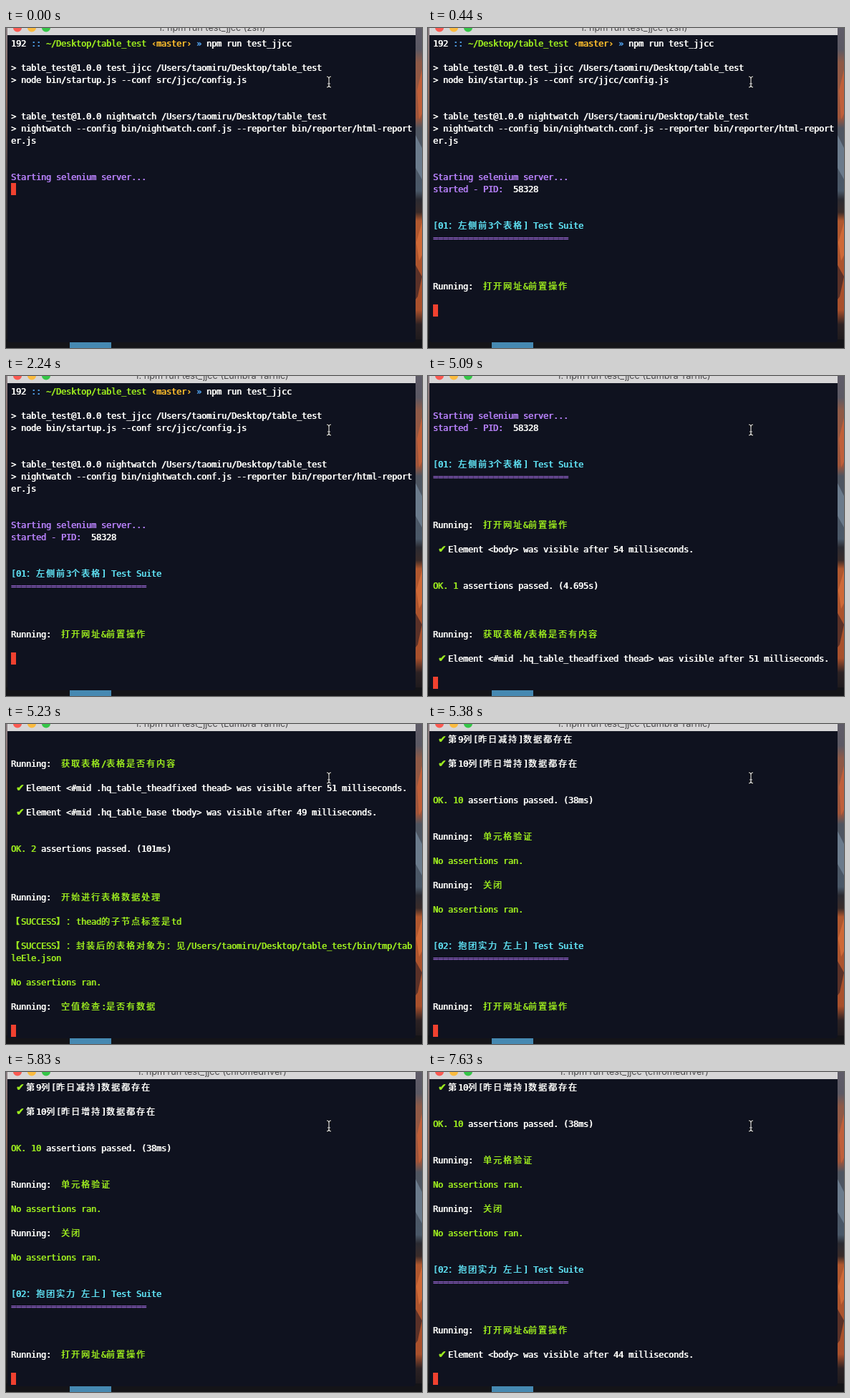
These frames come from a looping animation (581x448 px, 8000 ms). An HTML page with a canvas:

```html
<!DOCTYPE html>
<html lang="zh-CN">
<head>
<meta charset="utf-8">
<style>
html, body { margin: 0; width: 100%; height: 100%; overflow: hidden; background: #111; }
canvas { display: block; width: 581px; height: 448px; }
</style>
</head>
<body>
<canvas id="stage" width="581" height="448"></canvas>
<script>
const ctx = document.getElementById('stage').getContext('2d');
const LOOP = 8000, CELL = 7, ROW = 17;
const MONO = '12px "DejaVu Sans Mono", monospace';
const HAN = '12px "Noto Sans CJK SC", "Noto Sans CJK", sans-serif';
const TICK = '14px "DejaVu Sans", sans-serif';
const W = '#fdfdfa', G = '#9be81f', P = '#b47ff6', C = '#5fe0f2', B = '#4f9fe8', Y = '#fabb2c', D = '#9463cc';

// Lines are [row, colour, text, colour, text, ...]
const run = (row, name) => [row, W, 'Running:  ', G, name];
const pass = (row, text) => [row, G, ' ✔ ', W, text];
const seen = (row, el, ms) => pass(row, `Element <${el}> was visible after ${ms} milliseconds.`);
const ok = (row, n, time) => [row, G, `OK. ${n}`, W, ` assertions passed. (${time})`];
const none = row => [row, G, 'No assertions ran.'];
const suite = (row, name) => [[row, C, `[${name}] Test Suite`], [row + 1, D, '='.repeat(27)]];
const server = row => [row, P, 'Starting selenium server...'];
const pid = row => [row, P, 'started - PID:', W, '  58328'];

const first = '01：左侧前3个表格', second = '02：抱团实力 左上';
const open = '打开网址&前置操作', content = '获取表格/表格是否有内容';
const home = '/Users/taomiru/Desktop/table_test';

const boot = [
  [0, W, '192 ', B, ':: ', G, '~/Desktop/table_test ', Y, '‹master› ', B, '» ', W, 'npm run test_jjcc'],
  [2, W, '> table_test@1.0.0 test_jjcc ' + home],
  [3, W, '> node bin/startup.js --conf src/jjcc/config.js'],
  [6, W, '> table_test@1.0.0 nightwatch ' + home],
  [7, W, '> nightwatch --config bin/nightwatch.conf.js --reporter bin/reporter/html-report'],
  [8, W, 'er.js'],
  server(11)
];
const started = [...boot, pid(12)];

const screens = [
  { at: 0, caret: 12, lines: boot },
  { at: 140, caret: 14, lines: started },
  { at: 440, caret: 22, lines: [...started, ...suite(15, first), run(20, open)] },
  { at: 5090, caret: 24, lines: [
    server(2), pid(3), ...suite(6, first),
    run(11, open), seen(13, 'body', 54), ok(16, 1, '4.695s'),
    run(20, content), seen(22, '#mid .hq_table_theadfixed thead', 51)
  ] },
  { at: 5230, caret: 24, lines: [
    run(2, content),
    seen(4, '#mid .hq_table_theadfixed thead', 51),
    seen(6, '#mid .hq_table_base tbody', 49),
    ok(9, 2, '101ms'),
    run(13, '开始进行表格数据处理'),
    [15, G, '【SUCCESS】：thead的子节点标签是td'],
    [17, G, `【SUCCESS】：封装后的表格对象为：见${home}/bin/tmp/tab`],
    [18, G, 'leEle.json'],
    none(20), run(22, '空值检查:是否有数据')
  ] },
  { at: 5380, caret: 24, lines: [
    pass(0, '第9列[昨日减持]数据都存在'), pass(2, '第10列[昨日增持]数据都存在'),
    ok(5, 10, '38ms'), run(8, '单元格验证'), none(10), run(12, '关闭'), none(14),
    ...suite(17, second), run(22, open)
  ] },
  { at: 7630, caret: 24, lines: [
    pass(0, '第10列[昨日增持]数据都存在'),
    ok(3, 10, '38ms'), run(6, '单元格验证'), none(8), run(10, '关闭'), none(12),
    ...suite(15, second), run(20, open), seen(22, 'body', 44)
  ] }
];
const titles = [
  { at: 0, name: 'zsh' },
  { at: 2240, name: 'Lumbra Tarnic' },
  { at: 5830, name: 'chromedriver' }
];
const current = (list, t) => list.filter(item => item.at <= t).pop();

function rect(color, x, y, w, h) {
  ctx.fillStyle = color;
  ctx.fillRect(x, y, w, h);
}

function poly(color, ...pts) {
  ctx.fillStyle = color;
  ctx.beginPath();
  for (let i = 0; i < pts.length; i += 2) ctx.lineTo(pts[i], pts[i + 1]);
  ctx.fill();
}

function fade(x, w, stops) {
  const g = ctx.createLinearGradient(0, 0, 0, 448);
  stops.forEach(([at, color]) => g.addColorStop(at / 448, color));
  rect(g, x, 0, w, 448);
}

function drawDesktop() {
  fade(572, 9, [[0, '#5f5c68'], [30, '#5b5964'], [48, '#8d5a48'], [125, '#a0553a'], [140, '#4f5560'],
    [228, '#4a5868'], [240, '#2b2b32'], [258, '#3a2c2a'], [270, '#b0582f'], [395, '#a8502c'], [415, '#2c2224'], [448, '#17161a']]);
  poly('#c0603a', 581, 58, 574, 88, 577, 128, 581, 120);
  poly('#6b7b8c', 572, 150, 581, 168, 581, 212, 572, 196);
  poly('#cf6a38', 581, 272, 573, 300, 577, 326, 581, 318);
  poly('#5a3128', 572, 332, 581, 348, 575, 376, 572, 380);
  fade(0, 2, [[0, '#8b7f84'], [90, '#8a6558'], [200, '#4a4244'], [300, '#353438'], [448, '#17161a']]);
  rect('#141418', 0, 436, 581, 12);
  rect('#4689b2', 89, 440, 58, 8);
}

function drawWindow(name) {
  ctx.fillStyle = '#0f121f';
  ctx.beginPath();
  ctx.roundRect(2, -10, 570, 450, 4);
  ctx.fill();
  rect('#d7d6d7', 2, 0, 570, 10);
  ['#fb5a52', '#fbbb3f', '#35c648'].forEach((color, i) => {
    ctx.fillStyle = color;
    ctx.beginPath();
    ctx.arc(16 + i * 20, -0.5, 6, 0, 7);
    ctx.fill();
  });
  ctx.font = '12.7px Inter, sans-serif';
  ctx.textAlign = 'center';
  ctx.fillStyle = '#4a494b';
  ctx.fillText(`1. npm run test_jjcc (${name})`, 287.5, 4);
  ctx.textAlign = 'left';
}

function drawLine([row, ...parts]) {
  const y = 26 + row * ROW;
  let x = 7;
  for (let i = 0; i < parts.length; i += 2) {
    ctx.fillStyle = parts[i];
    for (const ch of parts[i + 1]) {
      const wide = ch > '\u2e80';
      ctx.font = wide ? HAN : ch === '✔' ? TICK : MONO;
      // Terminal bold: each glyph struck twice
      ctx.fillText(ch, x - 0.2, y);
      ctx.fillText(ch, x + 0.6, y);
      x += wide ? CELL * 2 : CELL;
    }
  }
}

function drawPointer() {
  ctx.beginPath();
  for (const side of [448, 454]) {
    ctx.moveTo(side, 68);
    ctx.quadraticCurveTo(451, 68, 451, 71);
    ctx.lineTo(451, 80);
    ctx.quadraticCurveTo(451, 83, side, 83);
  }
  ctx.moveTo(449, 78);
  ctx.lineTo(453, 78);
  ctx.strokeStyle = '#08090d';
  ctx.lineWidth = 3;
  ctx.stroke();
  ctx.strokeStyle = '#dcdcdc';
  ctx.lineWidth = 1.2;
  ctx.stroke();
}

function draw(t) {
  const screen = current(screens, t);
  drawDesktop();
  drawWindow(current(titles, t).name);
  screen.lines.forEach(drawLine);
  rect('#f0412f', 7, 13 + screen.caret * ROW, CELL, ROW);
  drawPointer();
}

const start = performance.now();
function tick() {
  draw((performance.now() - start) % LOOP);
  requestAnimationFrame(tick);
}
tick();
</script>
</body>
</html>
```
